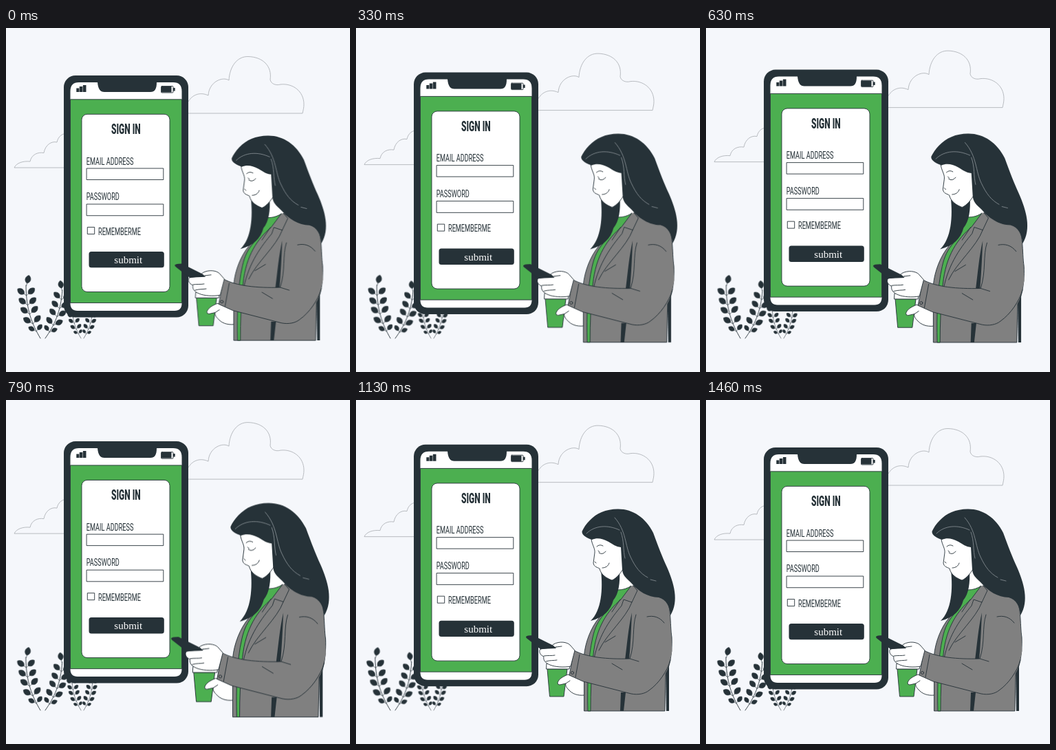
An HTML page without scripts for the animation above (1.5 s loop, 500 by 500 pixels).

```html
<!DOCTYPE html>
<html lang="en">
<head>
<meta charset="utf-8">
<title>Sign in</title>
<style>
  html, body { margin: 0; width: 100%; height: 100%; overflow: hidden; background: #f5f7fb; }
  svg { display: block; width: 100%; height: 100%; }
  .float, .beat, .sway { animation: 1500ms linear -20ms infinite; }
  .float { animation-name: float; }
  .beat { animation-name: beat; transform-origin: 366px 305px; }
  .sway { animation-name: sway; }
  .sway.large { transform-origin: 52px 451px; }
  .sway.small { transform-origin: 110px 451px; }
  @keyframes float {
    0%, 100% { transform: translateY(.3px); }
    50% { transform: translateY(-9.7px); }
  }
  @keyframes beat {
    0%, 30%, 40%, 60%, 100% { transform: scale(1); }
    10%, 50% { transform: scale(1.1); }
  }
  @keyframes sway {
    0%, 100% { transform: rotate(0deg); }
    25% { transform: rotate(1deg); }
    75% { transform: rotate(-1deg); }
  }
  .ink { fill: #263238; }
  .green { fill: #4caf50; }
  .gray { fill: #808080; }
  .white { fill: #fff; }
  .line { fill: none; stroke: #263238; stroke-width: .9; stroke-linecap: round; stroke-linejoin: round; }
  .edge { stroke: #263238; stroke-width: .9; stroke-linejoin: round; }
  .cloud { fill: none; stroke: #a9adb1; stroke-width: .8; }
  .shine { fill: none; stroke: #8d959a; stroke-width: .8; stroke-linecap: round; }
  .label { font: 400 14.8px Roboto, sans-serif; fill: #263238; }
  .title { font-size: 19.3px; font-weight: 800; }
  .submit { font: 15px "Liberation Serif", serif; fill: #fff; }
</style>
</head>
<body>
<svg viewBox="0 0 500 500">
  <defs>
    <path id="leaf" d="M0 0V-4C-5.500-7-5-13 0-16C5-13 5.500-7 0-4" stroke="#263238" stroke-width=".6"/>
    <g id="pair">
      <use href="#leaf" transform="rotate(-52)"/>
      <use href="#leaf" transform="rotate(48)"/>
    </g>
    <g id="sprig">
      <path class="line" d="M0 0C-12-20-21-42-21-77"/>
      <use href="#leaf" transform="translate(-20.5 -76) rotate(14)"/>
      <use href="#pair" transform="translate(-20.5 -62)"/>
      <use href="#pair" transform="translate(-18.5 -48)"/>
      <use href="#pair" transform="translate(-15.5 -35) rotate(-3)"/>
      <use href="#pair" transform="translate(-11 -21) rotate(-6)"/>
      <use href="#pair" transform="translate(-6 -10) rotate(-9) scale(.8)"/>
    </g>
  </defs>

  <!-- Plants -->
  <g class="sway large ink">
    <use href="#sprig" x="50" y="451"/>
    <use href="#sprig" transform="translate(57 451) rotate(4) scale(-.95 .93)"/>
  </g>
  <g class="sway small ink">
    <use href="#sprig" transform="translate(109 451) scale(.62)"/>
    <use href="#sprig" transform="translate(113 451) scale(-.62 .62)"/>
  </g>

  <!-- Clouds and phone -->
  <g class="float">
    <path class="cloud" d="M90 203H12C15 196 25 193 35 194C37 184 46 180 55 181.500C57 170 66 164 74 166C76 157 82 153 90 153"/>
    <path class="cloud" d="M260 124H431C432 119 433 116 433 111C433 92 417 80 399 82C392 84 385 81 384 75C387 55 373 42 352 41.500C336 41 325 56 324 76C315 70 295 78 294 98C281 92 270 98 265 107"/>

    <rect class="ink" x="84" y="69" width="181" height="351.500" rx="17"/>
    <path class="white" d="M106 79H133C134 89 137 93 143 93H210C216 93 219 89 219 79H243Q255.500 79 255.500 92V400Q255.500 411 245 411H104Q93.500 411 93.500 400V92Q93.500 79 106 79Z"/>
    <rect class="green edge" x="93.500" y="103.800" width="162" height="295.700"/>
    <path class="ink" d="M102.300 93V87.500H106.300V93ZM106.800 93V85H111.300V93ZM111.800 93V83H116.500V93Z"/>
    <rect class="line" x="225.500" y="84.500" width="17.500" height="9.500" rx="1"/>
    <path class="ink" d="M226 85H240.500V93.500H226ZM243 87H245.700V91.500H243Z"/>

    <rect class="white edge" x="110" y="125.300" width="128" height="258.200" rx="8"/>
    <g class="line">
      <rect x="117.500" y="204" width="111.300" height="16.500"/>
      <rect x="117.500" y="256" width="111.300" height="16.700"/>
      <rect x="118.700" y="289.500" width="10" height="10"/>
    </g>
    <rect class="ink" x="120.500" y="325" width="109.300" height="23.300" rx="3.500"/>
    <text class="label title" transform="translate(153 154.300) scale(.62 1)">SIGN IN</text>
    <g class="label">
      <text transform="translate(116.700 198.700) scale(.62 1)">EMAIL ADDRESS</text>
      <text transform="translate(116.700 250.300) scale(.62 1)">PASSWORD</text>
      <text transform="translate(134 300.700) scale(.62 1)">REMEMBERME</text>
    </g>
    <text class="submit" x="157.300" y="342">submit</text>
  </g>

  <!-- Woman -->
  <g class="beat">
    <path class="ink" d="M450 388L455 382V452H451Z"/>

    <!-- Cup and lower hand -->
    <path class="green edge" d="M278 391H307L302 431H281.500Z"/>
    <path class="white edge" d="M277 383L311 385L310 391H276.500Z"/>
    <path class="white edge" d="M293 411C295 405 301 402 308 399L332 406V429C322 430 314 427 309 421C306 418 304 415 305 412L296 414Q293 414 293 411Z"/>
    <path class="line" d="M305 412L311 408"/>

    <!-- Jacket -->
    <path class="gray edge" d="M400 268C415 278 430 282 448 284C459 296 456 325 459 345C460 372 455 390 450 398L449 452H331.500V372C333 352 342 330 353 317L383 275Z"/>
    <path class="white" d="M382 248V278L404 269L387 246Z"/>
    <path class="green edge" d="M380 276C388 276 395 274 400 270L385 290C366 306 349 330 345 370C342 398 341 425 341 452H337C336 415 337 375 344 345C347 331 352 321 360 312Z"/>
    <path class="line" d="M403 270L409 277L401 294L389 290L386 299C372 316 353 340 346 376M401 294C392 318 365 339 353 364M384 290L372 308"/>
    <path class="line" d="M362 352L377 343"/>
    <path class="ink" d="M401 309C400 332 399 355 397 378H391C394 355 396 330 401 309ZM385 425H392L389 452H384Z"/>

    <!-- Sleeve -->
    <path class="gray" d="M407 313L440 295L456 320L459.500 365C456 385 445 405 426 422C420 427 410 429 400 427L330 409L310 400L317 364C335 374 365 377 398 376L404 350Z"/>
    <path class="line" d="M407 312C401 330 406 352 398 376C365 377 335 374 317 364L310 400L330 409L400 427C410 429 420 427 426 422C440 412 452 395 457 378"/>
    <path class="line" d="M423 315C432 313 441 315 448 324M398 376L411 380M372 383L387 392M325 370L319 403"/>
    <circle class="line" cx="314.500" cy="396.500" r="2"/>

    <!-- Upper hand and handset -->
    <path class="white edge" d="M287 355C296 350 307 352 311 356L318 364L312 387C302 389 289 388 282 385C274 382 272 377 273 373C268 371 265 366 268 362L282 360Z"/>
    <path class="ink" d="M247 344Q248 342 257 342L287 357L291 361L268 362L249 347Q247 346 247 344Z"/>
    <path class="line" d="M268 362C276 359 284 361 291 359M273 372C279 371 284 372 289 371M276 380C282 378 287 379 292 378M291 359L299 358"/>

    <!-- Head -->
    <path class="ink" d="M356 248C359 275 357 306 341 321C360 316 370 306 374 291C382 282 384 265 383 248Z"/>
    <path class="white edge" d="M342 198C341 208 348 215 347 222L345 237C346 243 351 243 354 245C356 254 364 259 372 262C379 259 384 252 388 246V203Z"/>
    <path class="ink" d="M328.500 191C333 181 344 168 357 163C364 160 372 158.500 380 158.500C402 158 421 171 432 193C439 212 445 228 452 243C462 266 470 292 457 313C456 300 451 290 440 287C424 287 410 277 402 268C395 260 388 257 387 247L385 214C377 213 374 210 367 206C358 201 350 200 343 203C337 201 328 197 328.500 191Z"/>
    <path class="shine" d="M335 194C347 182 366 181 383 189M376 171C393 190 391 212 399 228C406 243 413 252 424 258M428 261L436 263M385 192C390 205 388 219 391 230"/>
    <path class="line" d="M350 213Q354 209 359 212M353 222Q358 226 363 220M354 221L352 219M358 244C363 244 367 241 368 237M347 235L349 237"/>
  </g>
</svg>
</body>
</html>
```
